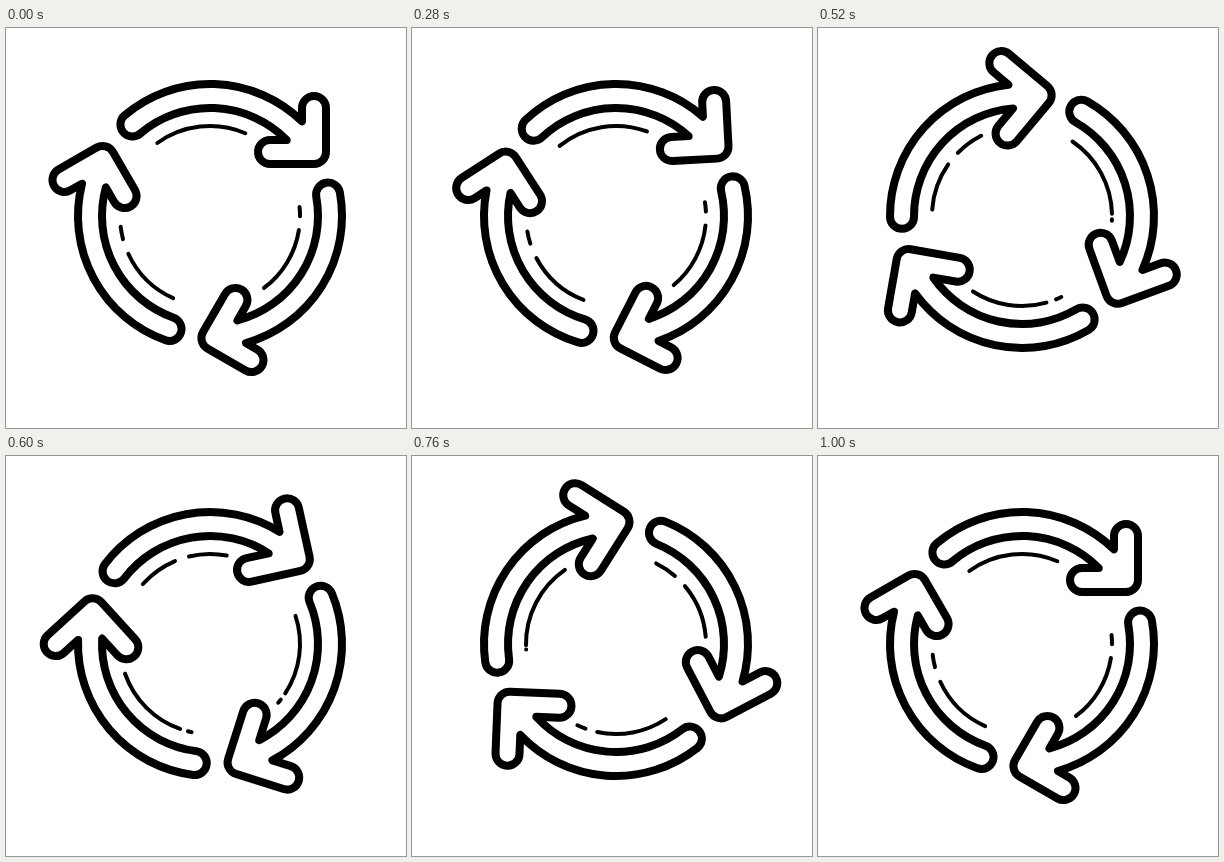
An HTML page for the animation above (1.12 s loop, 400 px wide and 400 px high).

```html
<!DOCTYPE html>
<html lang="en">
<head>
<meta charset="utf-8">
<title>Cycle arrows</title>
<style>
  html, body { margin: 0; width: 100%; height: 100%; overflow: hidden; background: #fff; }
  svg { display: block; width: 100%; height: 100%; }
  path { fill: none; stroke: #000; stroke-linecap: round; stroke-linejoin: round; }
  .arrow { stroke-width: 8; }
  .trace { stroke-width: 4; }
</style>
</head>
<body>
<svg viewBox="0 0 400 400"><g id="wheel"></g></svg>
<script>
const LOOP = 1120, STEP = 40, TURN = 240;
const OUTER = 132, INNER = 108, CAP = 12, TAIL = -40.3;
const TRACE = 90, TRACE_START = -37, TRACE_SPAN = 61.3, TIP = 1.2;

// [time ms, degrees, degrees per ms]
const spin = [
  [120, 0, 0], [280, -3, 0.1], [440, 37, 0.346], [600, 107.6, 0.465],
  [680, 146, 0.465], [840, 212, 0.3], [1000, TURN, 0]
];
// Length of the arrowhead bars
const stretch = [
  [120, 44, 0], [280, 44.7, 0.015], [440, 50, 0], [840, 50, 0], [1000, 44, 0]
];

// Cubic Hermite curve through the keys
function curve(keys, t) {
  if (t <= keys[0][0]) return keys[0][1];
  const i = keys.findIndex(k => k[0] > t);
  if (i < 0) return keys[keys.length - 1][1];
  const [t0, a, va] = keys[i - 1], [t1, b, vb] = keys[i];
  const h = t1 - t0, u = (t - t0) / h, w = u * u * (3 - 2 * u);
  return a + (b - a) * w + h * u * (1 - u) * (va * (1 - u) - vb * u);
}

// Point on a circle, degrees clockwise from the top
function polar(r, deg) {
  const a = deg * Math.PI / 180;
  return `${(r * Math.sin(a)).toFixed(2)} ${(-r * Math.cos(a)).toFixed(2)}`;
}

function arrowPath(bar) {
  const top = -64 - bar, left = 104 - bar;
  const cap = `A${CAP} ${CAP} 0 0 1 `;
  const neckY = -Math.sqrt(OUTER ** 2 - 92 ** 2);
  const neckX = Math.sqrt(INNER ** 2 - 76 ** 2);
  return `M${polar(OUTER, TAIL)}A${OUTER} ${OUTER} 0 0 1 92 ${neckY}` +
    `V${top}${cap}116 ${top}V-64${cap}104 -52H${left}${cap}${left} -76H${neckX}` +
    `A${INNER} ${INNER} 0 0 0 ${polar(INNER, TAIL)}${cap}${polar(OUTER, TAIL)}Z`;
}

function segment(from, to) {
  const a = TRACE_START + from + TIP;
  const b = Math.max(TRACE_START + to - TIP, a + 0.05);
  return `M${polar(TRACE, a)}A${TRACE} ${TRACE} 0 0 1 ${polar(TRACE, b)}`;
}

function tracePath([from, to]) {
  if (to <= from) return segment(0, TRACE_SPAN);
  return segment(0, from) + segment(to, TRACE_SPAN);
}

// The break in each thin arc opens at the front, slides back and closes
const gaps = [
  p => [43.4 + 19 * (1 - p), 50.9 + 10 * (1 - p)],
  p => [8.4 - 8 * p, 14.8 - 16 * p],
  p => [43.4 - 35 * p, 50.9 - 36.1 * p]
];

const wheel = document.getElementById("wheel");

function addPath(parent, name) {
  const path = document.createElementNS(wheel.namespaceURI, "path");
  path.setAttribute("class", name);
  return parent.appendChild(path);
}

const parts = gaps.map((gap, i) => {
  const group = document.createElementNS(wheel.namespaceURI, "g");
  group.setAttribute("transform", `rotate(${i * 120})`);
  wheel.appendChild(group);
  return { gap, arrow: addPath(group, "arrow"), trace: addPath(group, "trace") };
});

function draw(ms) {
  const t = Math.floor((ms % LOOP) / STEP) * STEP;
  const angle = curve(spin, t);
  const p = Math.max(0, angle / TURN);
  const head = arrowPath(curve(stretch, t));
  wheel.setAttribute("transform", `translate(204 188) rotate(${angle.toFixed(3)})`);
  for (const { gap, arrow, trace } of parts) {
    arrow.setAttribute("d", head);
    trace.setAttribute("d", tracePath(gap(p)));
  }
}

const start = performance.now();
function tick() {
  draw(performance.now() - start);
  requestAnimationFrame(tick);
}
tick();
</script>
</body>
</html>
```
